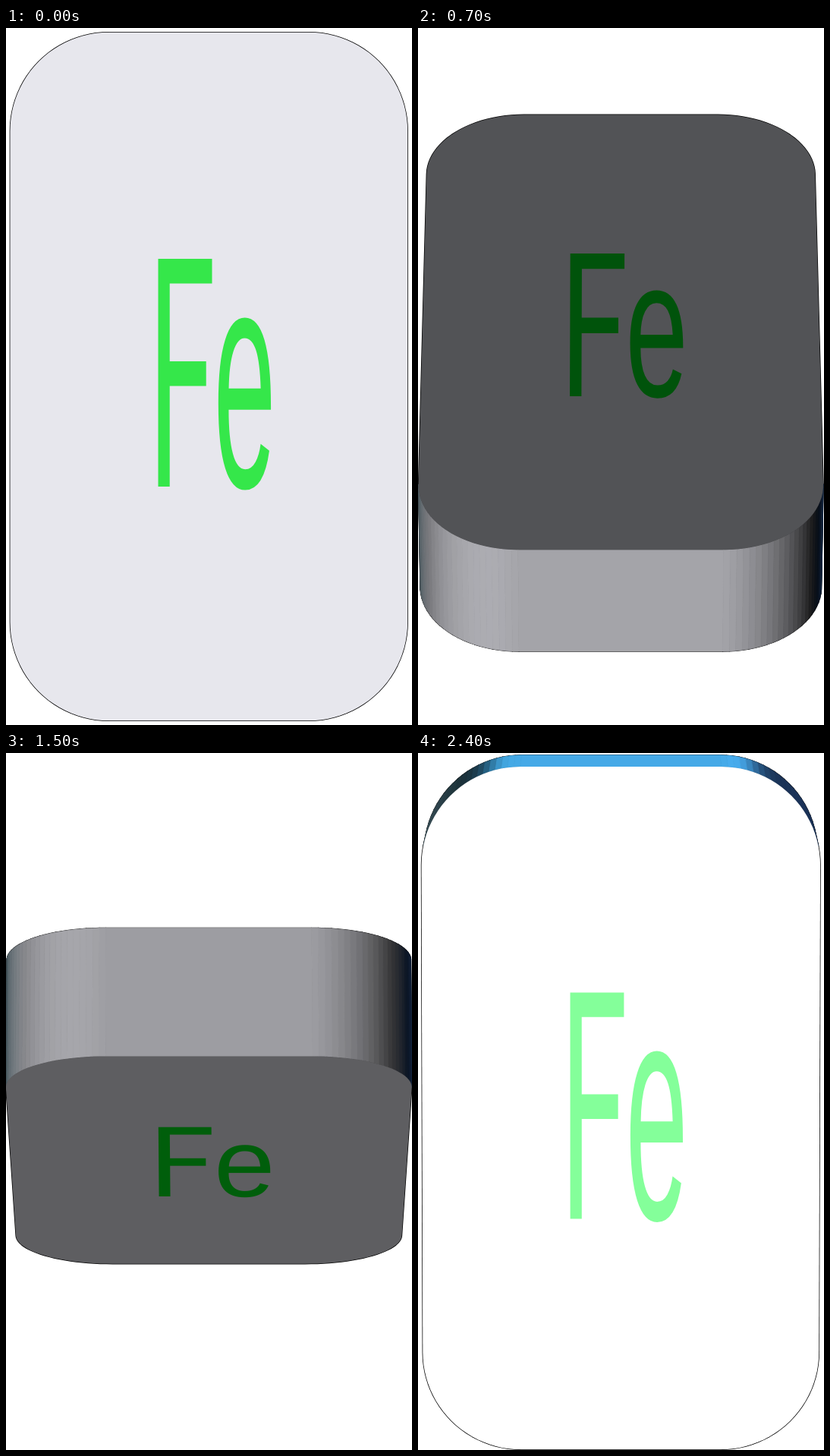
Animation, 535 px wide and 918 px high, one loop 2.5 s. Source, as an HTML page with a canvas:

```html
<!DOCTYPE html>
<html lang="en">
<head>
<meta charset="utf-8">
<title>Rotating element tile</title>
<style>
  html, body { margin: 0; width: 535px; height: 918px; overflow: hidden; background: #fff; }
  canvas { display: block; }
</style>
</head>
<body>
<canvas id="stage" width="535" height="918"></canvas>
<script>
const ctx = document.getElementById('stage').getContext('2d');

const STEP_MS = 100, STEPS = 25;            // half a turn per loop
const CX = 267.3, CY = 459, CAMERA = 12000;
const HALF_W = 260, HALF_H = 450, HALF_D = 86, RADIUS = 129, ARC_STEPS = 24;

const METAL = [1, 1, 1.03], GREEN = [0, 1, 0.12];

// One white light in front, two tinted ones behind the top corners
const LIGHTS = [
  { dir: [-0.28, -0.216, 0.935], diffuse: 191, color: [1, 1, 1],
    half: [-0.05, -0.111, 0.9925], power: 150, shine: 163, shineColor: [1, 1, 1] },
  { dir: [0.45, 0.45, -0.77], diffuse: 150, color: [0.32, 0.6, 1],
    half: [0.17, 0.965, 0.2], power: 40, shine: 155, shineColor: [0.3, 0.77, 1] },
  { dir: [-0.45, 0.45, -0.77], diffuse: 70, color: [0.25, 0.8, 0.95],
    half: [-0.17, 0.965, 0.2], power: 40, shine: 155, shineColor: [0.3, 0.77, 1] }
];

// Letters in the plane of the face: left origin, baseline, em width and em height
const LETTERS = [
  { char: 'F', font: 'Roboto', x: -79.5, y: -144, w: 160, h: 419 },
  { char: 'e', font: '"Liberation Sans"', x: 6.2, y: -144.5, w: 146.5, h: 411.5 }
];

const outline = makeOutline();
let sin = 0, cos = 1;

// Rounded rectangle, counter-clockwise with y upwards
function makeOutline() {
  const points = [];
  const corners = [[1, 1], [-1, 1], [-1, -1], [1, -1]];
  corners.forEach(([sx, sy], i) => {
    for (let k = 0; k <= ARC_STEPS; k++) {
      const a = (i + k / ARC_STEPS) * Math.PI / 2;
      points.push({
        x: sx * (HALF_W - RADIUS) + RADIUS * Math.cos(a),
        y: sy * (HALF_H - RADIUS) + RADIUS * Math.sin(a),
        a
      });
    }
  });
  return points;
}

function project(x, y, z) {
  const depth = z * cos - y * sin;
  const s = CAMERA / (CAMERA - depth);
  return [CX + x * s, CY - (y * cos + z * sin) * s];
}

const dot = (a, b) => a[0] * b[0] + a[1] * b[1] + a[2] * b[2];

function shade(normal, material) {
  const rgb = [0, 0, 0];
  for (const light of LIGHTS) {
    const d = light.diffuse * Math.max(0, dot(normal, light.dir));
    const s = light.shine * Math.max(0, dot(normal, light.half)) ** light.power;
    for (let i = 0; i < 3; i++) {
      rgb[i] += material[i] * d * light.color[i] + s * light.shineColor[i];
    }
  }
  return `rgb(${rgb.map(v => Math.min(255, Math.round(v))).join(',')})`;
}

function polygon(points) {
  const path = new Path2D();
  points.forEach(([x, y], i) => i ? path.lineTo(x, y) : path.moveTo(x, y));
  path.closePath();
  return path;
}

function visibleWalls(front, back) {
  const walls = [];
  outline.forEach((p, i) => {
    const j = (i + 1) % outline.length;
    const [a, b, c] = [front[i], front[j], back[i]];
    const facing = (b[0] - a[0]) * (c[1] - a[1]) - (b[1] - a[1]) * (c[0] - a[0]);
    if (facing <= 0) return;
    const end = j ? outline[j].a : Math.PI * 2;
    const mid = (p.a + end) / 2;
    const ny = Math.sin(mid);
    walls.push({
      path: polygon([a, b, back[j], c]),
      color: shade([Math.cos(mid), ny * cos, -ny * sin], METAL)
    });
  });
  return walls;
}

function drawLetter({ char, font, x, y, w, h }) {
  const mid = x + w * 0.3;
  const base = project(mid, y, HALF_D);
  const right = project(mid + w, y, HALF_D);
  const up = project(mid, y + h, HALF_D);
  ctx.save();
  ctx.transform((right[0] - base[0]) / 100, (right[1] - base[1]) / 100,
    (base[0] - up[0]) / 100, (base[1] - up[1]) / 100, base[0], base[1]);
  ctx.font = `100px ${font}, sans-serif`;
  ctx.fillText(char, -30, 0);
  ctx.restore();
}

function draw(step) {
  const turn = step * Math.PI / STEPS;
  const tilt = turn > Math.PI / 2 ? turn - Math.PI : turn;
  sin = Math.sin(tilt);
  cos = Math.cos(tilt);

  const front = outline.map(p => project(p.x, p.y, HALF_D));
  const back = outline.map(p => project(p.x, p.y, -HALF_D));
  const walls = visibleWalls(front, back);
  const face = polygon(front);
  const normal = [0, sin, cos];

  ctx.fillStyle = '#fff';
  ctx.fillRect(0, 0, 535, 918);

  // Dark rim that stays only around the silhouette
  ctx.lineJoin = 'round';
  ctx.strokeStyle = '#000';
  ctx.lineWidth = 1.5;
  walls.forEach(wall => ctx.stroke(wall.path));
  ctx.stroke(face);

  // Thin strokes close the seams between the walls
  ctx.lineWidth = 0.9;
  for (const { path, color } of walls) {
    ctx.fillStyle = ctx.strokeStyle = color;
    ctx.fill(path);
    ctx.stroke(path);
  }
  ctx.fillStyle = shade(normal, METAL);
  ctx.fill(face);

  ctx.fillStyle = shade(normal, GREEN);
  LETTERS.forEach(drawLetter);
}

const start = performance.now();
let shown = -1;

function tick() {
  const step = Math.floor((performance.now() - start) / STEP_MS) % STEPS;
  if (step !== shown) draw(shown = step);
  requestAnimationFrame(tick);
}
tick();
</script>
</body>
</html>
```
